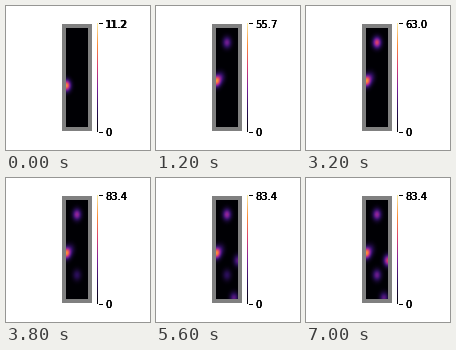
Write a matplotlib script that moves like this. It is 144 px wide and 144 px high and loops after 8000 ms.

```python
import numpy as np
import matplotlib.pyplot as plt
from matplotlib.animation import FuncAnimation
from matplotlib.colors import LinearSegmentedColormap
from matplotlib.patches import Rectangle

SIZE, DPI = 144, 72
STEP, FRAMES = 200, 40
X0, X1, Y0, Y1 = 60, 82, 22, 121

PEAKS = {0: 11.2, 1: 55.7, 16: 63.0, 17: 83.4}

# Each spot: x, y, frame it appears, frame it is complete, height
SPOTS = [
    (65, 71, 1, 1, 12),
    (71, 36.5, 6, 11, 38),
    (71, 97, 19, 35, 30),
    (78, 120, 23, 24, 27),
    (82, 82.5, 28, 33, 50),
]
FIRST_SHARE = 0.55

heat = LinearSegmentedColormap.from_list(
    "heat", ["#000004", "#2c0f5c", "#7a1f9a", "#d93f70", "#fb8b38", "#fbe9a0"])

gx, gy = np.meshgrid(np.arange(X0, X1) + 0.5, np.arange(Y0, Y1) + 0.5)


def bump(x, y, sx=2.9, sy=3.9):
    return np.exp(-((gx - x) / sx) ** 2 / 2 - ((gy - y) / sy) ** 2 / 2)


def peak_at(i):
    return PEAKS[max(start for start in PEAKS if start <= i)]


def field(i):
    peak = peak_at(i)
    total = 0.78 * peak * bump(60.5, 75 if i else 79.5)
    for x, y, first, last, height in SPOTS:
        if i >= first:
            share = 1 if i >= last else FIRST_SHARE
            total = total + share * height * bump(x, y)
    return total / peak


fig = plt.figure(figsize=(SIZE / DPI, SIZE / DPI), dpi=DPI, facecolor="white")
ax = fig.add_axes([0, 0, 1, 1])
ax.axis("off")


def box(x, y, w, h, color):
    ax.add_patch(Rectangle((x, y), w, h, fc=color, lw=0, antialiased=False))


def label(y, text):
    # Slightly shifted copies give the heavy strokes
    return [ax.text(x, y, text, size=10, family="DejaVu Sans",
                    va="center_baseline", ha="left")
            for x in (99, 99, 99.6, 99.6)]


def heatmap(data, extent):
    return ax.imshow(data, cmap=heat, vmin=0, vmax=1, aspect="auto",
                     extent=extent, interpolation="nearest", zorder=2)


box(56, 18, 30, 107, "#808080")
image = heatmap(field(0), (X0, X1, Y1, Y0))
heatmap(np.linspace(1, 0, 109)[:, None], (91, 92, 126, 17))
ax.set_xlim(0, SIZE)
ax.set_ylim(SIZE, 0)

for y in (17, 126):
    box(93, y, 4, 1, "black")
top = label(17.5, "11.2")
label(126.5, "0")


def update(i):
    image.set_data(field(i))
    for t in top:
        t.set_text(f"{peak_at(i):.1f}")
    return [image, *top]


anim = FuncAnimation(fig, update, frames=FRAMES, interval=STEP,
                     repeat=True, repeat_delay=0, blit=False)
plt.show()
```
